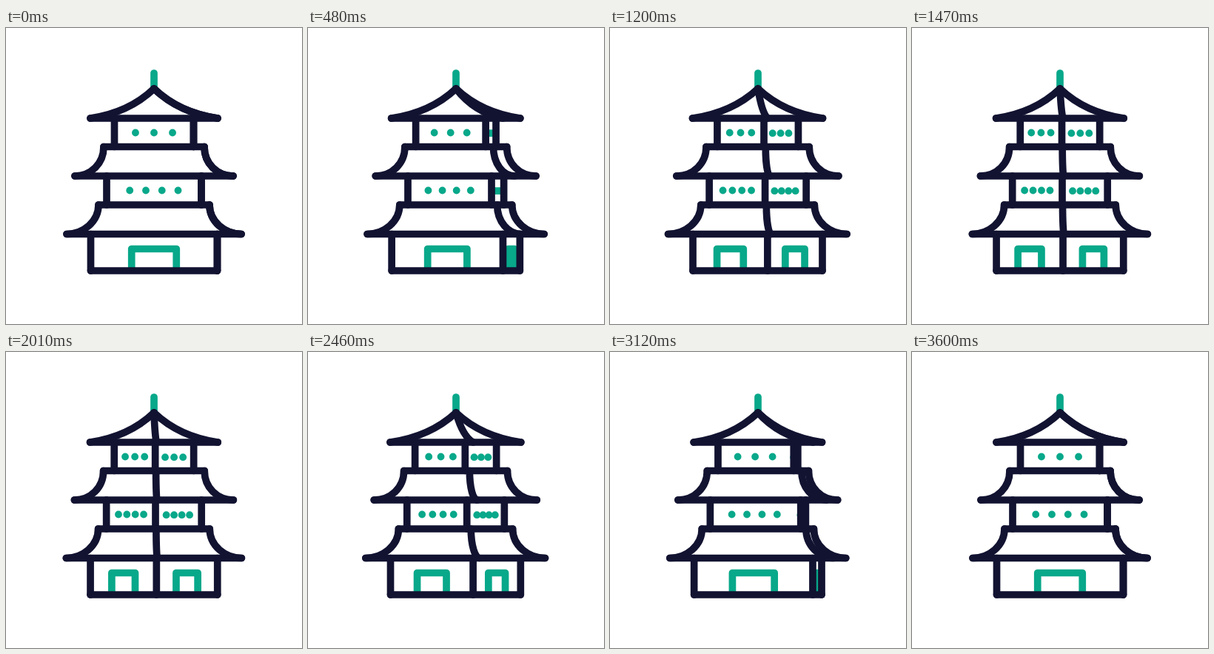
Recreate the animation shown at these times as an HTML page with a canvas. Size 400x400 px, loop 3630 ms.

```html
<!DOCTYPE html>
<html lang="en">
<head>
<meta charset="utf-8">
<title>Turning pagoda</title>
<style>
  html, body { margin: 0; width: 100%; height: 100%; overflow: hidden; background: #fff; }
  canvas { display: block; width: 400px; height: 400px; }
</style>
</head>
<body>
<canvas id="stage"></canvas>
<script>
const DARK = '#121331', GREEN = '#08a88a';
const LOOP = 3630, STEP = 30, CX = 200;

// Keys are [ms, value]. Turn: 0 = one face in front, 1 = corner in front.
const TURN = [[0, 0], [480, .258], [930, .688], [1470, .953], [1800, 1], [2460, .73], [3120, .135], [3600, 0]];
const WALL_TURN = [[0, 0], [480, .25], [930, .69], [1470, .953], [1800, 1], [2460, .77], [3120, .098], [3600, 0]];
const SPREAD = [[0, 0], [480, .016], [910, .052], [1110, .038], [1470, .005], [1800, 0],
                [2160, .012], [2460, .035], [2640, .052], [2730, .047], [3120, .01], [3600, 0]];

// Each roof: top half-width and y, eave half-width and y, and two curve handles.
const ROOFS = [
  { top: [0, 82], eave: [86, 122], c1: [22, 103], c2: [52, 117] },
  { top: [68, 160.5], eave: [107, 200], c1: [68, 183], c2: [85, 200] },
  { top: [75, 239], eave: [118, 278.5], c1: [75, 262], c2: [96, 278.5] }
];
const WALLS = [
  { half: 53.5, top: 122, bottom: 160.5 },
  { half: 64, top: 200, bottom: 239 },
  { half: 85.5, top: 278.5, bottom: 328 }
];
const DOT_ROWS = [
  { wall: WALLS[0], y: 141.5, at: [.266, .5, .734] },
  { wall: WALLS[1], y: 219.5, at: [.244, .414, .584, .754] }
];

const canvas = document.getElementById('stage');
const ctx = canvas.getContext('2d');
const ratio = window.devicePixelRatio || 1;
canvas.width = canvas.height = 400 * ratio;

// Smooth interpolation that never overshoots its keys.
function sample(keys, t) {
  const last = keys.length - 1;
  if (t >= keys[last][0]) return keys[last][1];
  let i = 0;
  while (t >= keys[i + 1][0]) i++;
  const slope = k => (keys[k + 1][1] - keys[k][1]) / (keys[k + 1][0] - keys[k][0]);
  const tangent = k => {
    if (k === 0 || k === last) return 0;
    const a = slope(k - 1), b = slope(k);
    return a * b <= 0 ? 0 : 2 * a * b / (a + b);
  };
  const [t0, v0] = keys[i], [t1, v1] = keys[i + 1];
  const d = t1 - t0, u = (t - t0) / d, w = 1 - u;
  return v0 * w * w * (1 + 2 * u) + v1 * u * u * (3 - 2 * u)
    + d * u * w * (tangent(i) * w - tangent(i + 1) * u);
}

function line(points) {
  ctx.beginPath();
  points.forEach(([x, y]) => ctx.lineTo(x, y));
  ctx.stroke();
}

function slopeCurve(roof, scale) {
  const p = ([x, y]) => [CX + x * scale, y];
  ctx.beginPath();
  ctx.moveTo(...p(roof.top));
  ctx.bezierCurveTo(...p(roof.c1), ...p(roof.c2), ...p(roof.eave));
  ctx.stroke();
}

function door(from, to) {
  const at = f => from + (to - from) * f;
  const a = at(.323), b = at(.677);
  line([[a, 327], [a, 298.5], [b, 298.5], [b, 327]]);
}

function dots(row, from, to, y, shift) {
  for (const f of row.at) {
    ctx.beginPath();
    ctx.arc(from + (to - from) * (f + shift), y, 4.9, 0, Math.PI * 2);
    ctx.fill();
  }
}

function draw(t) {
  const turn = sample(TURN, t), wallTurn = sample(WALL_TURN, t), spread = sample(SPREAD, t);
  const leftScale = -(1 + spread), rightScale = 1 + spread * .6;
  const left = half => CX + half * leftScale;
  const right = half => CX + half * rightScale;
  const corner = half => CX + half * (1 - turn);

  ctx.setTransform(ratio, 0, 0, ratio, 0, 0);
  ctx.fillStyle = '#fff';
  ctx.fillRect(0, 0, 400, 400);
  ctx.lineCap = ctx.lineJoin = 'round';

  ctx.strokeStyle = ctx.fillStyle = GREEN;
  ctx.lineWidth = 9.7;
  line([[CX, 61], [CX, 82]]);
  const base = WALLS[2].half;
  door(left(base), corner(base));
  if (turn > .01) door(corner(base), right(base));
  for (const row of DOT_ROWS) {
    const half = row.wall.half;
    dots(row, left(half), corner(half), row.y, 0);
    if (turn > .01) dots(row, corner(half), right(half), row.y + .7, -.015);
  }

  ctx.strokeStyle = DARK;
  for (const wall of WALLS) {
    const edge = CX + wall.half * (1 - (wall.half === base ? turn : wallTurn));
    for (const x of [left(wall.half), edge, right(wall.half)]) {
      line([[x, wall.top], [x, wall.bottom]]);
    }
  }
  line([[left(base), 328], [right(base), 328]]);
  for (const roof of ROOFS) {
    for (const scale of [leftScale, 1 - turn, rightScale]) slopeCurve(roof, scale);
    for (const [half, y] of [roof.top, roof.eave]) line([[left(half), y], [right(half), y]]);
  }
}

const start = performance.now();
function frame() {
  const t = (performance.now() - start) % LOOP;
  draw(Math.floor(t / STEP) * STEP);
  requestAnimationFrame(frame);
}
frame();
</script>
</body>
</html>
```
